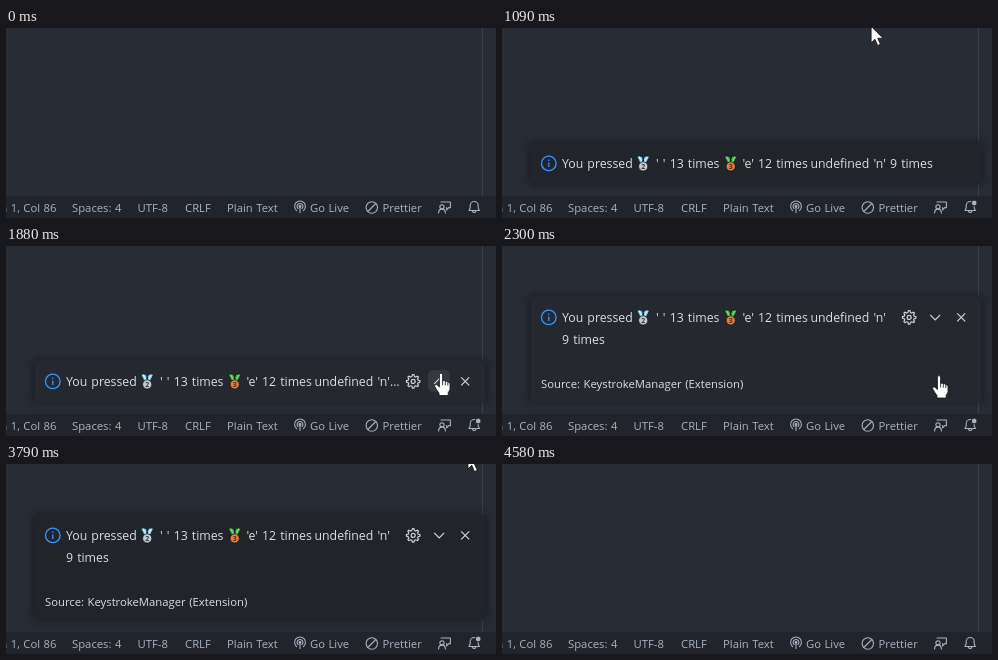
Animation of 490 by 190 pixels, one loop 4790 ms. Source, as an HTML page:

```html
<!DOCTYPE html>
<html lang="en">
<head>
<meta charset="utf-8">
<title>Keystroke notification</title>
<style>
  html, body { margin: 0; width: 100%; height: 100%; overflow: hidden; background: #282c34; }
  svg { display: block; width: 490px; height: 190px; }
  text { font-family: "Open Sans", "Noto Sans", sans-serif; white-space: pre; word-spacing: .5px; }
  .status text { font-size: 11.3px; fill: #abb2bf; }
  .line { fill: none; stroke: #abb2bf; stroke-width: 1.1; stroke-linecap: round; stroke-linejoin: round; }
  .msg { font-size: 12.3px; fill: #dadde2; }
  .msg text { word-spacing: .9px; }
  .from { font-size: 11.3px; fill: #dadde2; }
  .tool { fill: none; stroke: #d0d3d9; stroke-width: 1.2; }
  .hot { fill: rgba(90, 93, 94, .31); }
  .digit { font-size: 7px; font-weight: 700; text-anchor: middle; fill: #33383e; }
</style>
</head>
<body>
<svg viewBox="0 0 490 190">
  <defs>
    <filter id="blur" x="-10%" y="-40%" width="120%" height="180%"><feGaussianBlur stdDeviation="4"/></filter>
    <g id="medal">
      <path d="M-6.5-7.2h5L2.2 0-2.4 1.2zM6.5-7.2h-5L-2.2 0 2.4 1.2z" stroke="#15181c" stroke-width=".8"/>
      <path d="M-4.2-6.7L-.6-.5M4.2-6.7L.6-.5" stroke="var(--stripe)" stroke-width="1.3"/>
      <circle cy="3" r="4.6" fill="var(--disc)" stroke="#15181c" stroke-width=".8"/>
    </g>
  </defs>

  <rect width="490" height="190" fill="#282c34"/>
  <path d="M476.5 0V168" stroke="#3b4048"/>

  <g id="toast">
    <rect class="box" x="27" width="454" fill="#000" opacity=".38" filter="url(#blur)"/>
    <rect id="card" class="box" x="29" width="450"/>
    <g id="body">
      <g fill="none" stroke="#3794ff" stroke-width="1.3">
        <circle cx="46.8" cy=".4" r="7.3"/>
        <path d="M46.8-.6v4.6M46.8-3.6v1.5"/>
      </g>
      <g class="msg">
        <text x="60" y="4.5">You pressed</text>
        <text x="154" y="4.5">' ' 13 times</text>
        <text x="240.5" y="4.5">'e' 12 times</text>
        <text x="308.5" y="4.5">undefined</text>
        <text id="tail" x="371.5" y="4.5">'n'</text>
        <text id="count" y="4.5">9 times</text>
      </g>
      <g transform="translate(141.2 .4)">
        <use href="#medal" fill="#7cc9f2" style="--stripe:#d3eefb;--disc:#c6ccd1"/>
        <text class="digit" y="5.5">2</text>
      </g>
      <g transform="translate(228.7 .4)">
        <use href="#medal" fill="#2fb344" style="--stripe:#7fdc6c;--disc:#f07a35"/>
        <text class="digit" y="5.5">3</text>
      </g>
      <g id="tools">
        <rect id="hot" class="hot" y="-11" width="22" height="22" rx="5"/>
        <g class="tool" transform="translate(.2 .4)">
          <circle cx="407" cy="0" r="2"/>
          <path id="gear"/>
          <path id="chevron"/>
          <path d="M455-4l8 8M463-4l-8 8"/>
        </g>
      </g>
    </g>
    <text id="from" class="from" x="39" y="142">Source: KeystrokeManager (Extension)</text>
  </g>

  <g class="status">
    <rect y="168" width="490" height="22" fill="#21252b"/>
    <text x="50.5" y="184" text-anchor="end">Ln 1, Col 86</text>
    <text x="66" y="184">Spaces: 4</text>
    <text x="131.5" y="184">UTF-8</text>
    <text x="179" y="184">CRLF</text>
    <text x="221" y="184">Plain Text</text>
    <text x="304" y="184">Go Live</text>
    <text x="376.5" y="184">Prettier</text>
    <g class="line">
      <path d="M290.6 182.6a5.4 5.4 0 1 1 6.8 0M292 180.5a2.9 2.9 0 1 1 4 0M294 179v5.5"/>
      <circle cx="294" cy="178.4" r=".9" fill="#abb2bf"/>
      <circle cx="365.8" cy="179.5" r="5.7"/>
      <path d="M361.8 183.5l8-8"/>
      <circle cx="436" cy="178.8" r="2.1"/>
      <path d="M432.6 185q0-3.9 3.4-3.9t3.4 3.9M435 174h9.4v5.6h-1.6l-2.2 2.2v-2.2"/>
      <path d="M463 182.5h10.4l-1.2-2.4v-2.6a4 4 0 0 0-8 0v2.6zM466.5 182.8a1.7 1.7 0 0 0 3.4 0"/>
    </g>
    <circle id="dot" cx="472.2" cy="175" r="2.9" fill="#abb2bf" stroke="#21252b"/>
  </g>

  <g id="cursor" fill="#fff" stroke="#111" stroke-width=".8" stroke-linejoin="round">
    <path id="arrow" d="M0 0V16.6L3.8 13 6.5 19.2 9.3 18 6.6 12H11.8z"/>
    <g id="hand">
      <path d="M-1.6 1.2Q0-1 1.6 1.2V8Q3.4 6.6 4.3 8.6 6 7.4 6.8 9.3 9 8.6 9 11v5.2Q8.6 18 7.2 19.6V22.5H-2V20Q-4.5 16.8-6.4 13.2-6.8 10.8-4.2 11.6L-1.6 14z"/>
      <path d="M1.6 8v4M4.3 8.6v3.6M6.8 9.3v3.2" fill="none"/>
    </g>
  </g>
</svg>

<script>
const LOOP = 4790, SHOW = 240, EXPAND = 2300, CLOSE = 4360;
const $ = id => document.getElementById(id);
const show = (id, on) => $(id).setAttribute('visibility', on ? 'inherit' : 'hidden');
const set = (id, attrs) => {
  for (const k in attrs) $(id).setAttribute(k, attrs[k]);
};

// Pointer trips: time, x, y
const trips = [
  [[1090, 369, -2], [1250, 391, 38], [1400, 412, 69], [1520, 423, 86], [1610, 426, 100],
   [1730, 431, 116], [1880, 435, 127], [2030, 437, 129.5], [2350, 437, 129.5],
   [2400, 446, 96], [2450, 456, 45], [2500, 468, -25]],
  [[3790, 462, -12], [3900, 461, 25], [4040, 460, 55], [4210, 459, 69], [4390, 459, 69],
   [4480, 472, 66], [4560, 492, 62]]
];

function pointer(t) {
  for (const trip of trips) {
    for (let i = 1; i < trip.length; i++) {
      const [t0, x0, y0] = trip[i - 1], [t1, x1, y1] = trip[i];
      if (t >= t0 && t < t1) {
        const k = (t - t0) / (t1 - t0);
        return { x: x0 + (x1 - x0) * k, y: y0 + (y1 - y0) * k };
      }
    }
  }
  return null;
}

function gearPath() {
  let d = '';
  for (let i = 0; i < 32; i++) {
    const a = (i - .5) / 32 * Math.PI * 2, r = i % 4 < 2 ? 6.8 : 5;
    d += (i ? 'L' : 'M') + (407 + r * Math.cos(a)).toFixed(2) + ' ' + (r * Math.sin(a)).toFixed(2);
  }
  return d + 'z';
}
set('gear', { d: gearPath() });

function draw(t) {
  const open = t >= SHOW && t < CLOSE;
  const big = t >= EXPAND;
  const top = big ? 50 : 114, mid = top + 21;
  const p = pointer(t);
  const inside = open && p && p.y >= top && p.y < 156;
  const tools = big || inside;
  const overRow = inside && Math.abs(p.y - mid) < 11;
  const hotX = overRow && [396, 422, 448].find(x => p.x >= x && p.x < x + 22);

  show('toast', open);
  show('dot', open);
  const left = 1 - Math.min(1, Math.max(0, (t - 225) / 300));
  set('toast', {
    opacity: 1 - left ** 1.8,
    transform: `translate(0 ${42 * left ** 1.8})`
  });
  document.querySelectorAll('.box').forEach(b => {
    b.setAttribute('y', top);
    b.setAttribute('height', 156 - top);
  });
  set('card', { fill: inside ? '#25292f' : '#21252b' });
  set('body', { transform: `translate(0 ${mid})` });
  $('tail').textContent = tools && !big ? "'n'…" : "'n'";
  set('count', big ? { x: 60, y: 26.5 } : { x: 388, y: 4.5 });
  show('count', big || !tools);
  show('from', big);
  show('tools', tools);
  show('hot', !!hotX);
  if (hotX) set('hot', { x: hotX });
  set('chevron', { d: big ? 'M428-2.5l5 5 5-5' : 'M428 2.5l5-5 5 5' });

  show('cursor', !!p);
  if (p) {
    const hand = !!hotX || (big && t < 2360);
    set('cursor', { transform: `translate(${p.x} ${p.y})` });
    show('arrow', !hand);
    show('hand', hand);
  }
}

const start = performance.now();
function tick() {
  draw((performance.now() - start) % LOOP);
  requestAnimationFrame(tick);
}
tick();
</script>
</body>
</html>
```
